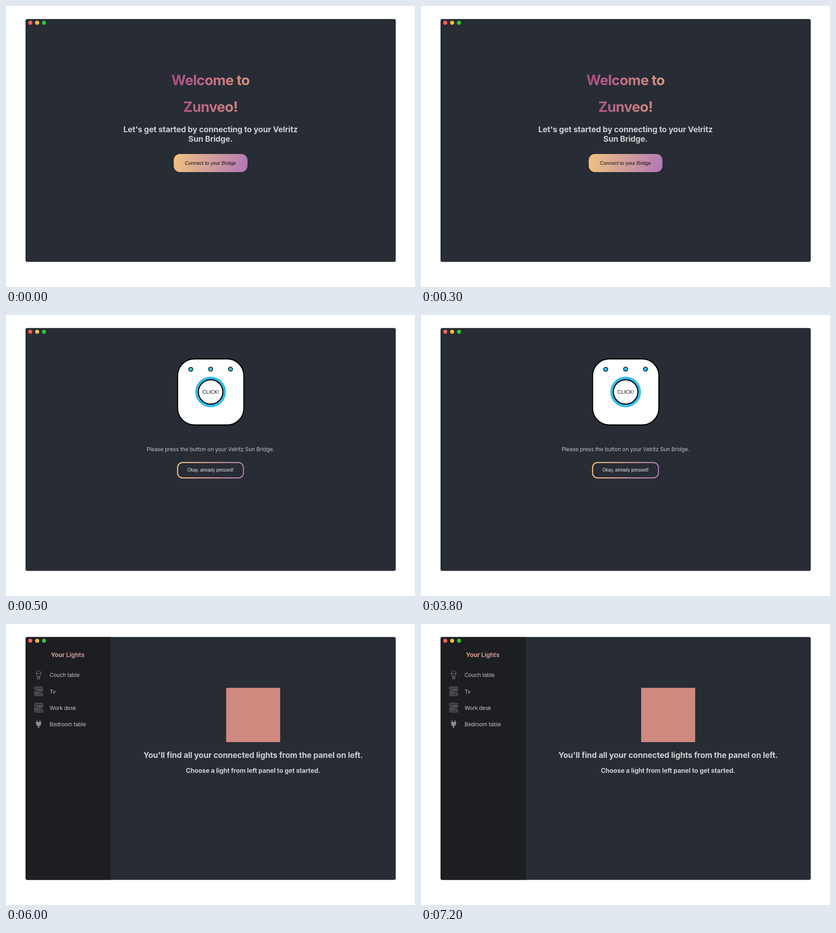
These frames come from a looping animation (901x621 px, 8 s). An HTML page:

```html
<!DOCTYPE html>
<html lang="en">
<head>
<meta charset="utf-8">
<title>Smart light setup</title>
<style>
  html, body { margin: 0; width: 100%; height: 100%; overflow: hidden; background: #fff; }
  svg { display: block; width: 901px; height: 621px; font-family: Inter, sans-serif; }
  .scene { visibility: hidden; }
  .scene.on { visibility: visible; }
  .mid { text-anchor: middle; }
  .title { font-size: 31px; font-weight: 700; letter-spacing: -.65px; fill: url(#dusk); }
  .lead { font-size: 17.5px; font-weight: 700; letter-spacing: -.13px; fill: #cfd0d1; }
  .sub { font-size: 14px; font-weight: 700; letter-spacing: -.08px; fill: #cfd0d1; }
  .body { font-size: 12px; letter-spacing: -.14px; fill: #bfc0c2; }
  .item { font-size: 12px; letter-spacing: -.22px; fill: #bfc0c2; }
  .side { font-size: 13.4px; font-weight: 700; fill: url(#peach); }
  .ui { font-family: "Liberation Sans", Arial, sans-serif; font-size: 11.05px; }
  .icon { fill: none; stroke: #8d8e90; stroke-width: .9; stroke-linejoin: round; }
</style>
</head>
<body>
<svg viewBox="0 0 901 621">
  <defs>
    <linearGradient id="dusk" gradientUnits="userSpaceOnUse" x1="365" y1="0" x2="537" y2="0">
      <stop stop-color="#a84c85"/><stop offset="1" stop-color="#d9947f"/>
    </linearGradient>
    <linearGradient id="peach">
      <stop stop-color="#dfa78a"/><stop offset="1" stop-color="#c18ba1"/>
    </linearGradient>
    <linearGradient id="candy" x1="0" y1=".47" x2="1" y2=".53">
      <stop stop-color="#eec180"/><stop offset="1" stop-color="#b27ab5"/>
    </linearGradient>
    <linearGradient id="shade">
      <stop stop-color="#1d1e22" stop-opacity=".6"/><stop offset="1" stop-color="#1d1e22" stop-opacity="0"/>
    </linearGradient>
    <clipPath id="frame"><rect x="43" y="28.8" width="815.6" height="536.6" rx="4"/></clipPath>
    <g id="strip" class="icon">
      <rect x=".5" y="0" width="18" height="5.4" rx="1"/>
      <path d="M18.5 4.5Q20 7 18 9.5L3 14 1.5 13 1 9.5 15.5 5.4"/>
      <rect x="1" y="14" width="18" height="5.4" rx="1"/>
      <path d="M3 2.7H17M4 11 16.5 7.5M3.5 16.7H17.5" stroke-width="1.7" stroke-dasharray="1.8 2"/>
    </g>
  </defs>

  <g clip-path="url(#frame)">
    <rect width="901" height="621" fill="#282c34"/>

    <g class="scene">
      <text class="title mid" x="450.5" y="174.5">Welcome to</text>
      <text class="title mid" x="450.5" y="233.5">Zunveo!</text>
      <text class="lead mid" x="450.5" y="278.5">Let's get started by connecting to your Velritz</text>
      <text class="lead mid" x="450.5" y="299.7">Sun Bridge.</text>
      <rect x="369.5" y="327" width="162.5" height="40" rx="14" fill="url(#candy)"/>
      <text class="ui mid" x="450.5" y="350.5" fill="#15110f">Connect to your Bridge</text>
    </g>

    <g class="scene">
      <g stroke="#000" stroke-width="2.4">
        <rect x="378" y="97" width="146" height="146" rx="37" fill="#fff"/>
        <g fill="#2cbcf0" stroke-width="1.5">
          <circle cx="407" cy="120" r="4.6"/>
          <circle cx="450.8" cy="119.5" r="4.6"/>
          <circle cx="494.5" cy="119.5" r="4.6"/>
        </g>
        <circle cx="450.8" cy="170" r="33.7" fill="#2cbcf0" stroke="none"/>
        <circle cx="450.8" cy="170" r="27" fill="#fff"/>
      </g>
      <text class="ui mid" x="451" y="174.2" fill="#111" style="font-size:11.5px">CLICK!</text>
      <text class="body mid" x="450.5" y="300.6">Please press the button on your Velritz Sun Bridge.</text>
      <rect x="378" y="326" width="145" height="34" rx="11" fill="none" stroke="url(#candy)" stroke-width="2.4"/>
      <text class="ui mid" x="450.5" y="346.2" fill="#e6e6e7" style="font-size:10px">Okay, already pressed!</text>
    </g>

    <g class="scene">
      <rect width="230.5" height="621" fill="#1d1e22"/>
      <rect x="230.5" width="2" height="621" fill="url(#shade)"/>
      <text class="side mid" x="136" y="73.3">Your Lights</text>
      <path class="icon" d="M66.3 108.5C65.5 102 78 102 77.2 108.5L74.3 116V121.5H69.3V116ZM66.3 108.5Q72 111 77.2 108.5M69.3 116H74.3M69.3 118.7H74.3"/>
      <use href="#strip" x="62" y="139"/>
      <use href="#strip" x="62" y="175.3"/>
      <path fill="#8d8e90" d="M67.7 212.5h1.7v4h4.6v-4h1.7v4h2.3v1.6h-.7v2.4q0 4-4.1 5v4.2h-2.8v-4.2q-4.1-1-4.1-5v-2.4h-.7v-1.6h2.1Z"/>
      <text class="item" x="96" y="117.3">Couch table</text>
      <text class="item" x="96" y="153.5">Tv</text>
      <text class="item" x="96" y="189.7">Work desk</text>
      <text class="item" x="96" y="226">Bedroom table</text>
      <rect x="485" y="141" width="119" height="120" fill="#cf897e"/>
      <text class="lead mid" x="544.5" y="296.3">You'll find all your connected lights from the panel on left.</text>
      <text class="sub mid" x="544.3" y="328.7">Choose a light from left panel to get started.</text>
    </g>

    <circle cx="53.5" cy="37" r="4.5" fill="#ff5f57"/>
    <circle cx="68.6" cy="37" r="4.5" fill="#febc2e"/>
    <circle cx="83.7" cy="37" r="4.5" fill="#28c840"/>
  </g>
</svg>
<script>
  const LOOP = 8000;
  const starts = [0, 500, 6000];
  const scenes = document.querySelectorAll('.scene');

  function draw() {
    const time = performance.now() % LOOP;
    const current = starts.filter(start => time >= start).length - 1;
    scenes.forEach((scene, i) => scene.classList.toggle('on', i === current));
    requestAnimationFrame(draw);
  }
  draw();
</script>
</body>
</html>
```
